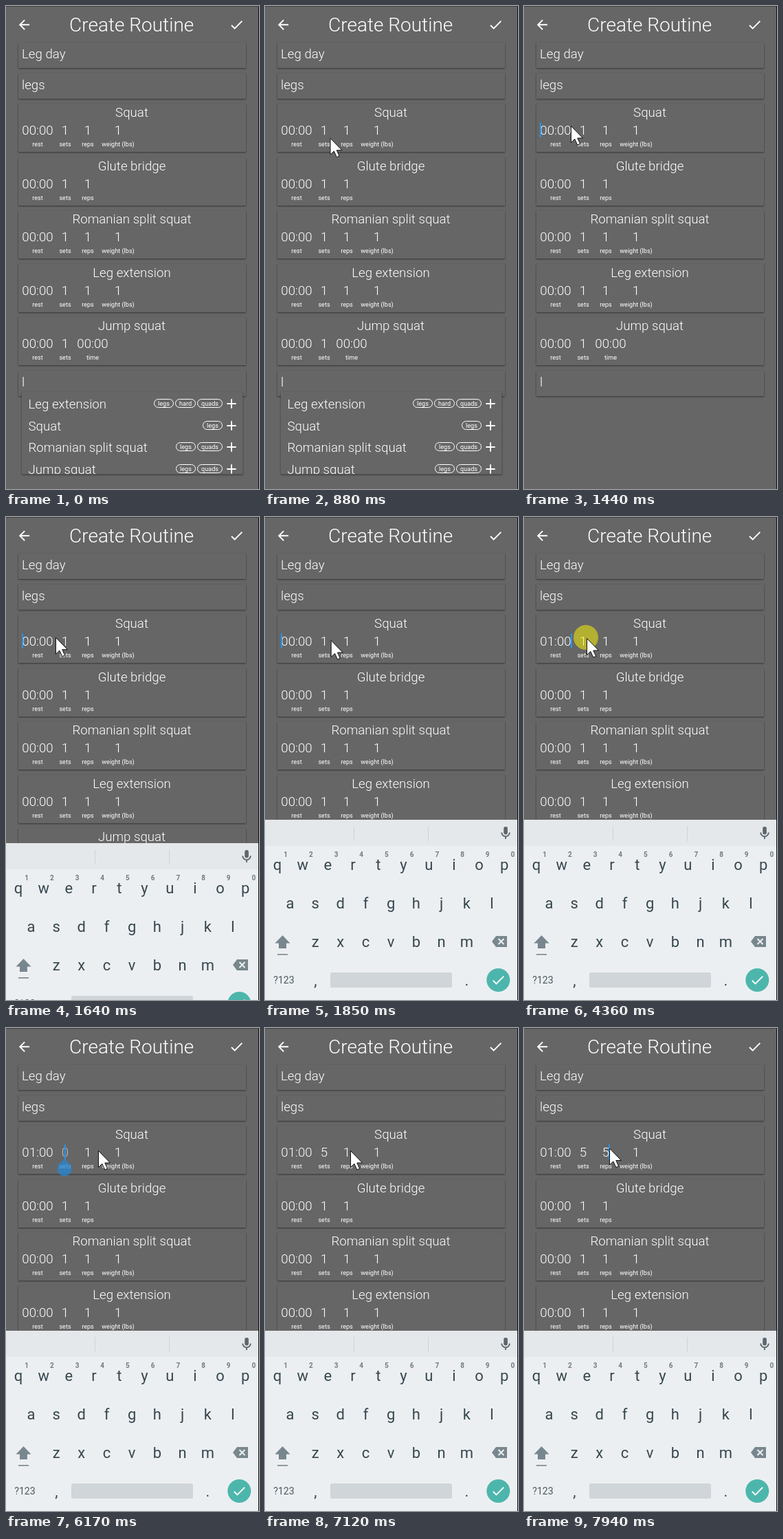
Recreate the animation shown at these times as an HTML page. Size 368 px wide and 702 px high, loop 8 s.

```html
<!DOCTYPE html>
<html lang="en">
<head>
<meta charset="utf-8">
<title>Create Routine</title>
<style>
  html, body { margin: 0; width: 100%; height: 100%; overflow: hidden; background: #666; }
  svg { display: block; width: 100%; height: 100%; font-family: Roboto, "Open Sans", sans-serif; }
  .app text { fill: #fff; font-weight: 300; font-size: 18.7px; }
  .app .title { font-size: 28px; }
  .app .small { font-size: 9.1px; font-weight: 400; }
  .card { fill: #666; filter: drop-shadow(0 1.6px 1.1px rgba(0, 0, 0, .5)); }
  .mid { text-anchor: middle; }
  .chip { fill: none; stroke: #fff; }
  .keys text { fill: #37474f; text-anchor: middle; font-size: 22px; }
  .keys .hint { fill: #6f7d84; font-size: 10px; font-weight: 700; }
  .keys .mode { font-size: 14.2px; fill: #4b5a61; }
</style>
</head>
<body>
<svg id="stage" viewBox="0 0 368 702" preserveAspectRatio="none"></svg>
<script>
const LOOP = 8000;

const text = (x, y, s, cls = '', id = '') =>
  `<text x="${x}" y="${y}" class="${cls}"${id && ` id="${id}"`}>${s}</text>`;
const rect = (x, y, w, h, attrs = '') =>
  `<rect x="${x}" y="${y}" width="${w}" height="${h}" ${attrs}/>`;
const card = (y, h) => rect(18, y, 331, h, 'class="card"');

// Line icons on a 24-unit grid
const icon = (cx, cy, d, color = '#fff') =>
  `<path transform="translate(${cx} ${cy}) scale(.95) translate(-12 -12)" d="${d}"
    fill="none" stroke="${color}" stroke-width="2"/>`;
const BACK = 'M20 12H5.4M12.7 4.7L5.4 12l7.3 7.3';
const CHECK = 'M4.1 12.7L9 17.6L20.3 6.3';
const PLUS = 'M12 5v14M5 12h14';

// --- Routine form ---
const field = (y, s, id) => card(y, 37) + text(23, Math.round(y + 23.2), s, '', id);

const CENTER = { rest: 46, sets: 86, reps: 119, 'weight (lbs)': 163, time: 126 };

const exercise = ([name, ...cols], i) => {
  const y = Math.round(142 + i * 77.6);
  const cells = cols.map(label => {
    const x = CENTER[label], value = /rest|time/.test(label) ? '00:00' : '1';
    return text(x, y + 45, value, 'mid', i ? '' : label) + text(x, y + 62, label, 'mid small');
  });
  return card(y, 70) + text(183, y + 19, name, 'mid') + cells.join('');
};

const EXERCISES = [
  ['Squat', 'rest', 'sets', 'reps', 'weight (lbs)'],
  ['Glute bridge', 'rest', 'sets', 'reps'],
  ['Romanian split squat', 'rest', 'sets', 'reps', 'weight (lbs)'],
  ['Leg extension', 'rest', 'sets', 'reps', 'weight (lbs)'],
  ['Jump squat', 'rest', 'sets', 'time']
];

// --- Suggestion list ---
const ruler = document.createElement('canvas').getContext('2d');
ruler.font = '9.1px Roboto, "Open Sans", sans-serif';

const suggestion = ([name, ...tags], i) => {
  const y = Math.round(578 + i * 31.6);
  let right = 315;
  const chips = tags.reverse().map(tag => {
    const w = Math.round(ruler.measureText(tag).width + 12), x = right - w;
    right = x - 2;
    return rect(x + .5, y - 6.5, w - 1, 12, 'rx="6" class="chip"') +
      text(x + w / 2, y + 3, tag, 'mid small');
  });
  return text(32.5, y + 7, name) + chips.join('') + icon(328, y, PLUS);
};

const SUGGESTIONS = [
  ['Leg extension', 'legs', 'hard', 'quads'],
  ['Squat', 'legs'],
  ['Romanian split squat', 'legs', 'quads'],
  ['Jump squat', 'legs', 'quads']
];

const app = `
  ${rect(0, 0, 368, 702, 'fill="#666"')}
  ${rect(0, 0, 368, 1, 'fill="#3c3c3c"')}
  <g class="app">
    ${icon(26.5, 27.3, BACK)}
    ${text(182.7, 37, 'Create Routine', 'mid title')}
    ${icon(335.5, 27.3, CHECK)}
    ${field(53, 'Leg day')}${field(97.8, 'legs')}
    ${EXERCISES.map(exercise).join('')}
    ${field(530, 'l', 'search')}
    <g id="list">
      ${rect(23, 561, 321.5, 119.5, 'class="card"')}
      <clipPath id="listClip">${rect(23, 561, 322, 119)}</clipPath>
      <g clip-path="url(#listClip)">${SUGGESTIONS.map(suggestion).join('')}</g>
    </g>
  </g>`;

// --- Keyboard ---
const PITCH = 36.7, GREY = '#78878e';
const keyRow = (keys, col, y, cls) =>
  [...keys].map((k, i) => text((18 + (col + i) * PITCH).toFixed(1), y, k, cls)).join('');

const keyboard = `
  <g id="keyboard" class="keys">
    ${rect(0, 440, 367, 262, 'fill="#eceff1"')}
    ${rect(0, 440, 367, 38, 'fill="#e4e8eb"')}
    ${[129, 237].map(x => rect(x, 449, 1, 22, 'fill="#cdd3d6"')).join('')}
    ${rect(347.2, 450, 5.7, 11.4, 'rx="2.85" fill="#5d676c"')}
    ${icon(350, 459.5, 'M5.9 11a6.1 6.1 0 0 0 12.2 0M12 17v4', '#5d676c')}
    ${keyRow('qwertyuiop', 0, 513)}
    ${keyRow('1234567890', .33, 494, 'hint')}
    ${keyRow('asdfghjkl', .5, 569)}
    ${keyRow('zxcvbnm', 1.5, 625)}
    <path d="M25.5 608L36.5 619.5H31V627H20V619.5H14.5Z" fill="${GREY}"/>
    ${rect(18, 635, 15, 1.6, `fill="${GREY}"`)}
    <path d="M330 617L336 609H352V625H336Z" fill="${GREY}"/>
    <path d="M339.5 613l8 8m0-8l-8 8" stroke="#eceff1" stroke-width="2"/>
    ${text(27.5, 678, '?123', 'mode')}
    ${text(73.5, 681, ',')}
    ${rect(95, 662, 177, 22, 'rx="2.5" fill="#cfd5d8"')}
    ${text(293.5, 681, '.')}
    <circle cx="339.3" cy="673" r="17" fill="#4db6ac"/>
    ${icon(339.3, 673, CHECK)}
  </g>`;

const overlay = `
  <rect id="caret" width="2" height="21.5" fill="#2b93e8"/>
  <path id="handle" d="M0-14.8L7.4-7.4A10.5 10.5 0 1 1-7.4-7.4Z" fill="#2686d2"/>
  <circle id="tap" r="18" fill="#fbf400" opacity=".52"/>
  <path id="pointer" d="M.5.5V24.5L5.8 19.3L9.8 28L13.6 26.3L9.8 18H17.5Z" fill="#fff" stroke="#111"/>
  ${rect(367, 0, 1, 702, 'fill="#111"')}`;

document.getElementById('stage').innerHTML = app + keyboard + overlay;
const el = id => document.getElementById(id);

// --- Timeline ---
const BLINK = 470, FADE = 270, TAP = 260;

// Pointer moves: start, duration, destination
const ENTRY = [265, 608];
const MOVES = [
  [200, 140, 131, 216], [610, 490, 68, 174], [1570, 300, 96, 179], [4060, 210, 91, 176],
  [4580, 330, 134, 178], [6850, 280, 124, 178], [7670, 230, 124, 174.5]
];
const TAPS = [1110, 4290, 7140];

// Focus changes and edits; an empty value shows the placeholder
const EDITS = [
  [-600, 'search', 'l'],
  [1440, 'rest', '00:00'], [2390, 'rest', '00:01'], [2460, 'rest', '00:10'], [3340, 'rest', '01:00'],
  [4600, 'sets', '1'], [6105, 'sets', ''], [6520, 'sets', '5'],
  [7400, 'reps', '1'], [7670, 'reps', ''], [7935, 'reps', '5']
];

const clamp = p => Math.max(0, Math.min(1, p));
const ease = p => p * p * (3 - 2 * p);
const show = (id, on) => el(id).setAttribute('visibility', on ? 'visible' : 'hidden');
const move = (id, x, y) => el(id).setAttribute('transform', `translate(${x} ${y})`);
const fade = (id, alpha) => el(id).setAttribute('opacity', alpha);

const pointerAt = t => MOVES.reduce(([x, y], [start, time, toX, toY]) => {
  const e = ease(clamp((t - start) / time));
  return [x + (toX - x) * e, y + (toY - y) * e];
}, ENTRY);

function setValue(id, value) {
  el(id).textContent = value || '0';
  fade(id, value ? 1 : .55);
}

function drawForm(t) {
  ['rest', 'sets', 'reps'].forEach(id => setValue(id, id === 'rest' ? '00:00' : '1'));
  const done = EDITS.filter(edit => edit[0] <= t);
  done.forEach(([, id, value]) => setValue(id, value));

  const [since, id, value] = done.pop();
  const age = t - since, box = el(id).getBBox();
  const along = value === '00:00' ? 0 : value ? 1 : .4;
  const x = Math.round(box.x + along * (box.width - 1));
  show('caret', age % (2 * BLINK) < BLINK);
  move('caret', x, el(id).getAttribute('y') - 17.5);

  // The handle follows a tapped number and fades once it is erased
  show('handle', value === '1' || value === '');
  move('handle', x, 204.8);
  fade('handle', value ? 1 : clamp(1 - age / FADE));
}

function draw(t) {
  show('list', t < 1440);
  show('keyboard', t >= 1570);
  move('keyboard', 0, Math.round(262 * (1 - clamp((t - 1500) / 400)) ** 4.67));
  drawForm(t);

  const [x, y] = pointerAt(t);
  show('pointer', t >= MOVES[0][0]);
  move('pointer', x, y);
  show('tap', TAPS.some(start => t >= start && t < start + TAP));
  move('tap', x - 1, y - 1);
}

const start = performance.now();
function tick() {
  draw((performance.now() - start) % LOOP);
  requestAnimationFrame(tick);
}
tick();
</script>
</body>
</html>
```
